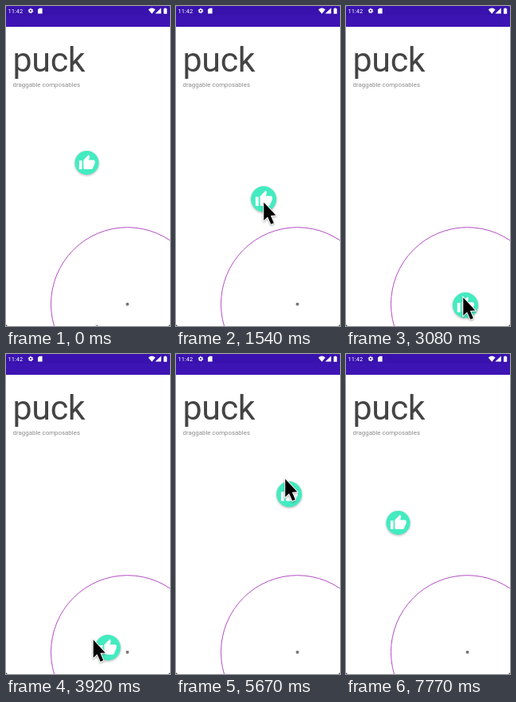
Recreate the animation shown at these times as an HTML page. Size 206 by 400 pixels, loop 7910 ms.

```html
<!DOCTYPE html>
<html lang="en">
<head>
<meta charset="utf-8">
<title>puck</title>
<style>
  html, body { margin: 0; width: 100%; height: 100%; overflow: hidden; background: #333; }
  svg { display: block; width: 206px; height: 400px; border-radius: 3px; font-family: Roboto, sans-serif; }
  #disc { filter: drop-shadow(0 1.8px 1.5px rgba(0, 0, 0, .3)); }
  #cursor { filter: drop-shadow(0 1px 1px rgba(0, 0, 0, .35)); }
</style>
</head>
<body>
<svg viewBox="0 0 206 400">
  <rect width="206" height="400" fill="#fff"/>

  <rect width="206" height="26" fill="#3d14b4"/>
  <rect width="206" height="12" fill="#3912ae"/>
  <g fill="#fff">
    <text x="2.6" y="9" font-size="7.5">11:42</text>
    <circle cx="31" cy="6" r="1.8" fill="none" stroke="#fff" stroke-width="1.4"/>
    <circle cx="31" cy="6" r="2.8" fill="none" stroke="#fff" stroke-dasharray="1.45 1.48"/>
    <path d="M40 4.6 42 2.7h3.6v6.8H40z"/>
    <path d="M178.8 4.4q4.4-3.6 8.8 0L183.2 9.8z"/>
    <path d="M194.8 2.4v7.2h-7.4z"/>
    <path d="M198 3.2h1.3v-.8h1.6v.8h1.3v6.6H198z"/>
  </g>

  <text x="8.6" y="82" font-size="43" letter-spacing="-.4" fill="#444">puck</text>
  <text x="8.6" y="101.1" font-size="7.9" fill="#8b8b8b">draggable composables</text>

  <circle cx="152.5" cy="372.7" r="96" fill="none" stroke="#b34cc4"/>
  <circle cx="152.5" cy="372.8" r="2" fill="#777"/>

  <g id="puck">
    <circle id="disc" r="15" fill="#43ebc0"/>
    <path fill="#fff" transform="translate(-10.5 -10.8) scale(.9)" d="M1 21h4V9H1v12zm22-11c0-1.1-.9-2-2-2h-6.31l.95-4.57.03-.32c0-.41-.17-.79-.44-1.06L14.17 1 7.59 7.59C7.22 7.95 7 8.45 7 9v10c0 1.1.9 2 2 2h9c.83 0 1.54-.5 1.84-1.22l3.02-7.05c.09-.23.14-.47.14-.73v-2z"/>
  </g>

  <path id="cursor" d="M.8 1.5V24L5.6 19.5 9.8 28.8 13.4 27.2 9.4 18 15.8 17.6z"
        stroke="#fff" stroke-width="2" paint-order="stroke"/>
</svg>
<script>
const LOOP = 7910, STEP = 70;
const LAG = 140;                  // the puck trails the pointer by this much
const GROW = 140, RETURN = 700;   // swell when held, glide back to the magnet
const HOME = [101.5, 196], MAGNET = [152.5, 372.5], REACH = 96;

// Pointer stops: arrival, x, y, pause
const path = [
  [0, 113, 397, 0], [770, 98, 185, 140], [1540, 109.5, 244, 0], [2590, 126, 307, 0],
  [2940, 146.5, 363, 490], [3570, 159, 367, 0], [4060, 96.5, 353, 630],
  [5040, 149, 369, 70], [5620, 137, 154, 0], [5880, 135, 162, 70],
  [6090, 139.5, 169.5, 70], [6860, 82, 215, 0], [7070, 66.5, 215, 140], [7630, 100, 403, 0]
].flatMap(([t, x, y, pause]) => pause ? [[t, x, y], [t + pause, x, y]] : [[t, x, y]]);

const drags = [[910, 3080], [3570, 4270], [5110, 6020], [6160, 7280]]; // grab, release

const clamp = u => Math.min(1, Math.max(0, u));

// Monotone cubic interpolation: pauses stay still and nothing overshoots
const slope = (i, c) =>
  path[i] && path[i + 1] ? (path[i + 1][c] - path[i][c]) / (path[i + 1][0] - path[i][0]) : 0;
function tangent(i, c) {
  const a = slope(i - 1, c), b = slope(i, c);
  return a * b > 0 ? 2 * a * b / (a + b) : 0;
}
function pointer(t) {
  const i = path.findLastIndex(p => p[0] <= t), p = path[i], q = path[i + 1];
  if (!q) return p.slice(1);
  const h = q[0] - p[0], u = (t - p[0]) / h, v = 1 - u;
  return [1, 2].map(c =>
    v * v * ((1 + 2 * u) * p[c] + u * h * tangent(i, c)) +
    u * u * ((1 + 2 * v) * q[c] - v * h * tangent(i + 1, c)));
}

// The puck follows each drag; dropped inside the ring it glides to the centre
function puckAt(t) {
  let pos = HOME, held = 0;
  for (const [grab, release] of drags) {
    if (t < grab) break;
    const from = pointer(grab);
    const to = pointer(Math.max(grab, Math.min(t, release) - LAG));
    pos = pos.map((p, c) => p + to[c] - from[c]);
    held = clamp((t - grab) / GROW) - clamp((t - release) / GROW);
    if (t > release && Math.hypot(pos[0] - MAGNET[0], pos[1] - MAGNET[1]) < REACH) {
      const rest = (1 - clamp((t - release) / RETURN)) ** 2.4;
      pos = pos.map((p, c) => MAGNET[c] + (p - MAGNET[c]) * rest);
    }
  }
  return { pos, scale: 1 + held / 15 };
}

const [puck, cursor] = ["puck", "cursor"].map(id => document.getElementById(id));
const place = (el, pos, scale = 1) =>
  el.setAttribute("transform", `translate(${pos}) scale(${scale})`);

const start = performance.now();
function draw() {
  const now = (performance.now() - start) % LOOP;
  const t = now - now % STEP;
  const { pos, scale } = puckAt(t);
  place(puck, pos, scale);
  place(cursor, pointer(t));
  requestAnimationFrame(draw);
}
draw();
</script>
</body>
</html>
```
